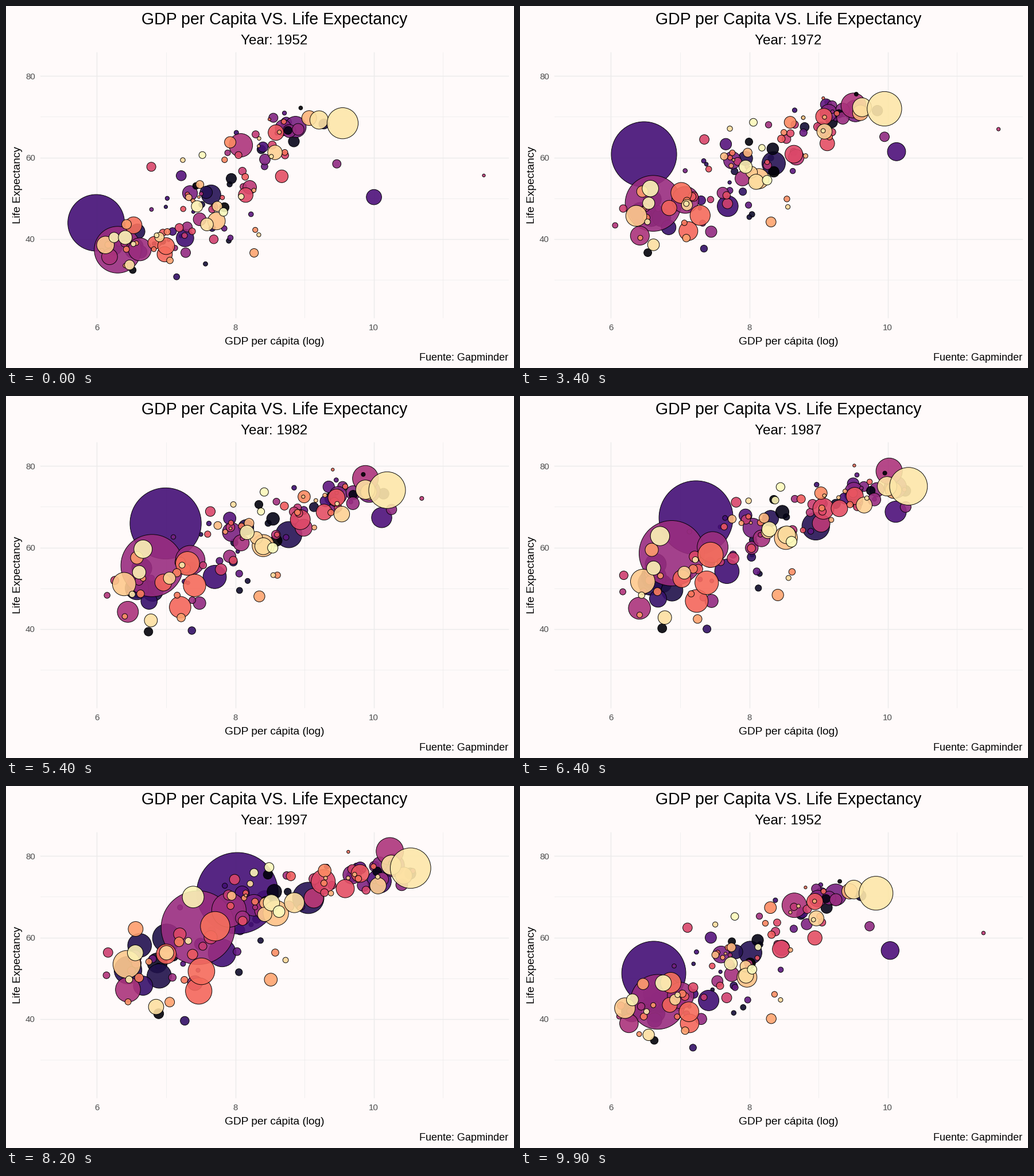
These frames come from a looping animation (885 px wide and 632 px high, 10000 ms). A matplotlib script:

```python
import numpy as np
import matplotlib.pyplot as plt
from matplotlib.animation import FuncAnimation

W, H, DPI = 885, 632, 100
PX = 72 / DPI
FRAMES, INTERVAL = 100, 100
YEARS = np.arange(1952, 2008, 5)
STEPS = len(YEARS)
MOVE = 4  # frames per transition
BACK, GRID, GREY = "#FFFAFA", "#EBEBEB", "#4D4D4D"
plt.rcParams["font.family"] = "Liberation Sans"

# Largest bubbles: shade, population at both ends (millions),
# then (log GDP, life expectancy) at a few key years.
KEY_YEARS = {3: (1952, 1987, 2007),
             4: (1952, 1972, 1987, 2007),
             5: (1952, 1962, 1972, 1987, 2007)}
GIANTS = [
    (.13, 47, 150, (6.53, 37.5), (6.62, 52.8), (7.24, 64.1)),
    (.15, 57, 190, (7.65, 50.9), (8.96, 65.2), (9.11, 72.4)),
    (.22, 556, 1319, (5.99, 44.0), (6.19, 44.5), (6.52, 63.1),
     (7.23, 67.3), (8.51, 73.0)),
    (.35, 69, 82, (8.87, 67.5), (10.11, 74.8), (10.38, 79.4)),
    (.43, 372, 1110, (6.30, 37.4), (6.88, 58.6), (7.81, 64.7)),
    (.44, 82, 224, (6.62, 37.5), (7.47, 60.1), (8.17, 70.7)),
    (.48, 86, 127, (8.08, 63.0), (9.60, 73.4), (10.02, 78.7), (10.36, 82.6)),
    (.52, .2, 2.5, (11.59, 55.6), (11.60, 67.7), (10.24, 74.2), (10.76, 77.6)),
    (.60, 30, 109, (8.15, 50.8), (9.07, 69.5), (9.39, 76.2)),
    (.68, 33, 135, (6.98, 36.3), (7.24, 46.9), (7.61, 46.9)),
    (.70, 41, 169, (6.53, 43.4), (7.44, 58.2), (7.87, 65.5)),
    (.93, 22, 71, (7.59, 43.6), (8.54, 63.1), (9.04, 71.8)),
    (.94, 50, 61, (9.21, 69.2), (9.99, 75.0), (10.41, 79.4)),
    (.95, 158, 301, (9.55, 68.4), (10.30, 75.0), (10.67, 78.2)),
    (.98, 26, 85, (6.41, 40.4), (6.71, 62.8), (7.80, 74.2)),
]

# Small bubbles scatter around three moving centres: count, skew,
# log GDP and life at start, middle and end, then the spreads.
CROWDS = [
    dict(count=32, skew=-1, gdp=(8.6, 9.45, 10.0), life=(65, 72.5, 77.5),
         gdp_sd=.42, life_sd=(3.5, 1.6), growth=1.4),
    dict(count=43, skew=1, gdp=(7.75, 8.4, 8.7), life=(50, 64, 71.5),
         gdp_sd=.5, life_sd=(6, 3), growth=2.6),
    dict(count=52, skew=1, gdp=(6.9, 7.1, 7.1), life=(38.5, 50, 53.5),
         gdp_sd=.6, life_sd=(3.5, 7), growth=3.2),
]


def to_px(log_gdp, life):
    return 158.3 + 120.6 * (log_gdp - 6), 407 - 7.125 * (life - 40)


def radius(pop):
    return 1.7 + 73.5 * np.sqrt(pop / 1319)


def grow(first, last):
    """Steady growth of a population over all state years."""
    return first * (last / first) ** np.linspace(0, 1, STEPS)


def giant(shade, pop_first, pop_last, *points):
    gdp, life = (np.interp(YEARS, KEY_YEARS[len(points)], values)
                 for values in zip(*points))
    return shade, gdp, life, grow(pop_first, pop_last)


def crowd(rng, shades, count, skew, gdp, life, gdp_sd, life_sd, growth):
    """Bubbles that keep their offset from the centre and drift a little."""
    def centre(values):
        return np.interp(YEARS, (1952, 1982, 2007), values)

    spread = np.linspace(*life_sd, STEPS)
    for shade in shades:
        side = skew * (rng.gamma(3) - 3) / np.sqrt(3)
        lift = .45 * side + .85 * rng.normal()
        drift = rng.normal(0, (.05, .5), (STEPS, 2)).cumsum(axis=0)
        pop = np.clip(4.2 * np.exp(1.2 * rng.normal()), .08, 45)
        yield (shade,
               np.clip(centre(gdp) + gdp_sd * side + drift[:, 0], 5.65, 10.6),
               np.clip(centre(life) + spread * lift + drift[:, 1], 29, 81),
               grow(pop, pop * growth))


def make_bubbles(rng):
    """Shades and an array of x, y, radius per state year and bubble."""
    total = sum(group["count"] for group in CROWDS)
    shades = iter(rng.permutation(np.linspace(0, 1, total)))
    bubbles = [giant(*row) for row in GIANTS]
    for group in CROWDS:
        own = [next(shades) for _ in range(group["count"])]
        bubbles += crowd(rng, own, **group)
    # Shades run from back to front; the darkest lie anywhere.
    bubbles.sort(key=lambda b: b[0] if b[0] > .04 else rng.random())
    shade, gdp, life, pop = map(np.array, zip(*bubbles))
    x, y = to_px(gdp, life)
    return shade, np.stack([x, y, radius(pop)], axis=-1).swapaxes(0, 1)


def timeline(frame):
    """State index and progress towards the next state."""
    i = np.arange(STEPS)
    starts = 4 + 8 * i + np.minimum(i, 4)
    passed = np.searchsorted(starts, frame, side="right") - 1
    if passed < 0:
        return 0, 0.0
    return passed, min((frame - starts[passed]) / MOVE, 1.0)


fig = plt.figure(figsize=(W / DPI, H / DPI), dpi=DPI, facecolor=BACK)
ax = fig.add_axes([0, 0, 1, 1])
ax.set_xlim(0, W)
ax.set_ylim(H, 0)
ax.axis("off")


def label(x, y, text, size, color="black", ha="center", **kw):
    return ax.text(x, y, text, fontsize=size * PX, color=color,
                   ha=ha, va="baseline", **kw)


def grid_line(xs, ys, major):
    ax.plot(xs, ys, color=GRID, lw=(1.42 if major else .71) * PX, zorder=1)


for value in range(6, 12):
    x, _ = to_px(value, 40)
    grid_line([x, x], [81, 543.5], value % 2 == 0)
    if value % 2 == 0:
        label(x, 565.5, str(value), 15, GREY)
for value in range(30, 90, 10):
    _, y = to_px(6, value)
    grid_line([60, 875], [y, y], value % 20 == 0)
    if value % 20 == 0:
        label(51, y + 5.5, str(value), 15, GREY, ha="right")

label(467.5, 32, "GDP per Capita VS. Life Expectancy", 28.5)
year_text = label(467, 67, "", 24.2)
label(467.5, 591, "GDP per cápita (log)", 19.1)
label(25, 313, "Life Expectancy", 19.1, rotation=90, rotation_mode="anchor")
label(875.5, 619, "Fuente: Gapminder", 18, ha="right")

shade, states = make_bubbles(np.random.default_rng(8))
dots = ax.scatter(states[0, :, 0], states[0, :, 1],
                  facecolors=plt.get_cmap("magma")(shade, alpha=.9),
                  edgecolors="black", linewidths=.94 * PX, zorder=2)


def draw(frame):
    state, t = timeline(frame)
    after = (state + 1) % STEPS
    now = states[state] * (1 - t) + states[after] * t
    dots.set_offsets(now[:, :2])
    dots.set_sizes((2 * now[:, 2] * PX) ** 2)
    year_text.set_text(f"Year: {YEARS[after if t > .5 else state]}")
    return dots, year_text


anim = FuncAnimation(fig, draw, frames=FRAMES, interval=INTERVAL,
                     repeat=True, repeat_delay=0, blit=False)
plt.show()
```
